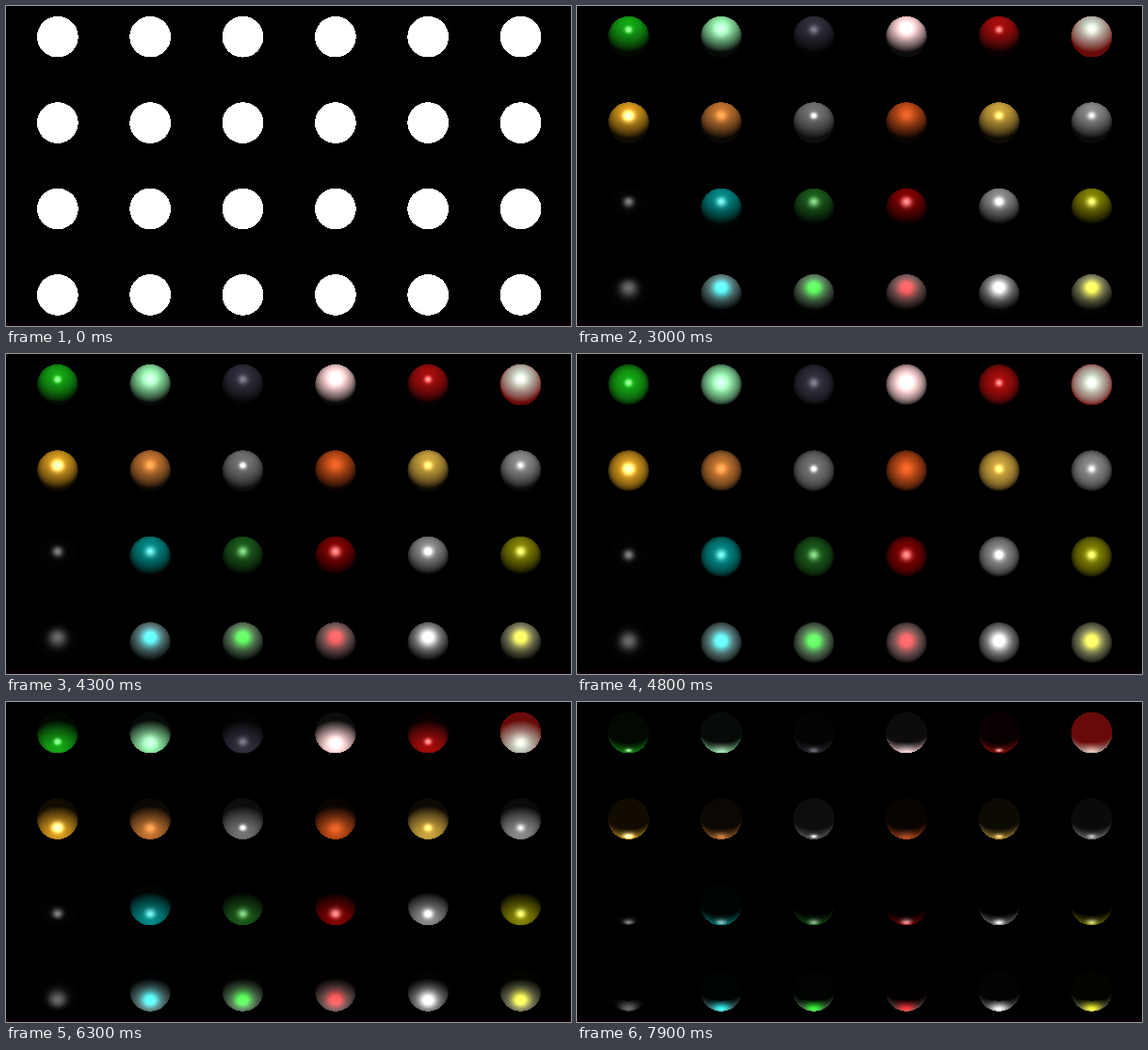
Write an HTML page with a canvas that moves like this. It is 600 by 340 pixels and loops after 8 s.

```html
<!DOCTYPE html>
<html lang="en">
<head>
<meta charset="utf-8">
<title>Lit spheres</title>
<style>
html, body { margin: 0; width: 100%; height: 100%; overflow: hidden; background: #000; }
canvas { display: block; width: 600px; height: 340px; }
</style>
</head>
<body>
<canvas id="stage" width="600" height="340"></canvas>
<script>
const W = 600, H = 340, LOOP = 8000, RADIUS = 21.8;
const ctx = document.getElementById('stage').getContext('2d');

// ambient, diffuse, specular, shininess
const materials = [
  '010901 139d13 a1baa1 77', '070b08 8ae3a1 515151 13', '030303 2f2b39 555458 38',
  '0d0b0b ffd3d3 4c4c4c 11', '090101 9d0b0b baa0a0 77', '680a09 54bdb0 4c4f4e 13',
  '110b01 c7911d fdf0ce 28', '0b0703 b66d2e 64452b 26', '0d0d0d 666666 c6c6c6 77',
  '0a0401 b34515 412316 13', '0d0a04 c09b3a a08e5d 51', '0a0a0a 818181 828282 51',
  '000000 030303 808080 32', '000503 008282 808080 32', '000000 1a591a 738c73 32',
  '000000 800000 b39999 32', '000000 8c8c8c b3b3b3 32', '000000 808000 999980 32',
  '010101 030303 666666 10', '000303 668080 0ab3b3 10', '000300 668066 0ab30a 10',
  '030000 806666 b30a0a 10', '030303 808080 b3b3b3 10', '030300 808066 b3b30a 10'
].map(row => {
  const [ambient, diffuse, specular, shine] = row.split(' ');
  return { ambient: rgb(ambient), diffuse: rgb(diffuse), specular: rgb(specular), shine: +shine };
});

function rgb(hex) {
  return [0, 2, 4].map(i => parseInt(hex.slice(i, i + 2), 16));
}

// Elevation of the light in degrees: [time, angle]
const path = [[2900, 45], [3200, 33], [3700, 54], [4800, 11], [7900, -119.2]];

function lightAngle(t) {
  if (t <= path[0][0]) return path[0][1];
  const i = path.findIndex(p => t <= p[0]);
  const [t0, a0] = path[i - 1], [t1, a1] = path[i];
  return a0 + (a1 - a0) * (t - t0) / (t1 - t0);
}

const image = ctx.createImageData(W, H);
const px = image.data;

function clearStage() {
  for (let i = 0; i < px.length; i += 4) {
    const strip = i >= 336 * W * 4;
    px[i] = strip ? 9 : 0;
    px[i + 1] = 0;
    px[i + 2] = strip ? 5 : 0;
    px[i + 3] = 255;
  }
}

function drawSphere(cx, cy, mat, light, half) {
  for (let y = Math.floor(cy - RADIUS); y <= cy + RADIUS; y++) {
    for (let x = Math.floor(cx - RADIUS); x <= cx + RADIUS; x++) {
      const nx = (x + 0.5 - cx) / RADIUS, ny = (cy - y - 0.5) / RADIUS;
      const zz = 1 - nx * nx - ny * ny;
      if (zz < 0) continue;
      const nz = Math.sqrt(zz), at = (y * W + x) * 4;
      if (!light) {
        px[at] = px[at + 1] = px[at + 2] = 255;
        continue;
      }
      const d = Math.max(0, ny * light[0] + nz * light[1]);
      const s = d && Math.pow(Math.max(0, ny * half[0] + nz * half[1]), mat.shine);
      for (let c = 0; c < 3; c++) {
        px[at + c] = mat.ambient[c] + mat.diffuse[c] * d + mat.specular[c] * s;
      }
    }
  }
}

function render(t) {
  const angle = lightAngle(t) * Math.PI / 180;
  const lit = t >= 1100;
  const light = lit && [Math.sin(angle), Math.cos(angle)];
  const half = [Math.sin(angle / 2), Math.cos(angle / 2)];
  clearStage();
  materials.forEach((mat, i) => {
    drawSphere(54.8 + 98.35 * (i % 6), 32.7 + 91.4 * Math.floor(i / 6), mat, light, half);
  });
  ctx.putImageData(image, 0, 0);
}

const start = performance.now();
let shown = -1;

function tick() {
  const t = Math.floor((performance.now() - start) % LOOP / 100) * 100;
  if (t !== shown) render(shown = t);
  requestAnimationFrame(tick);
}
tick();
</script>
</body>
</html>
```
